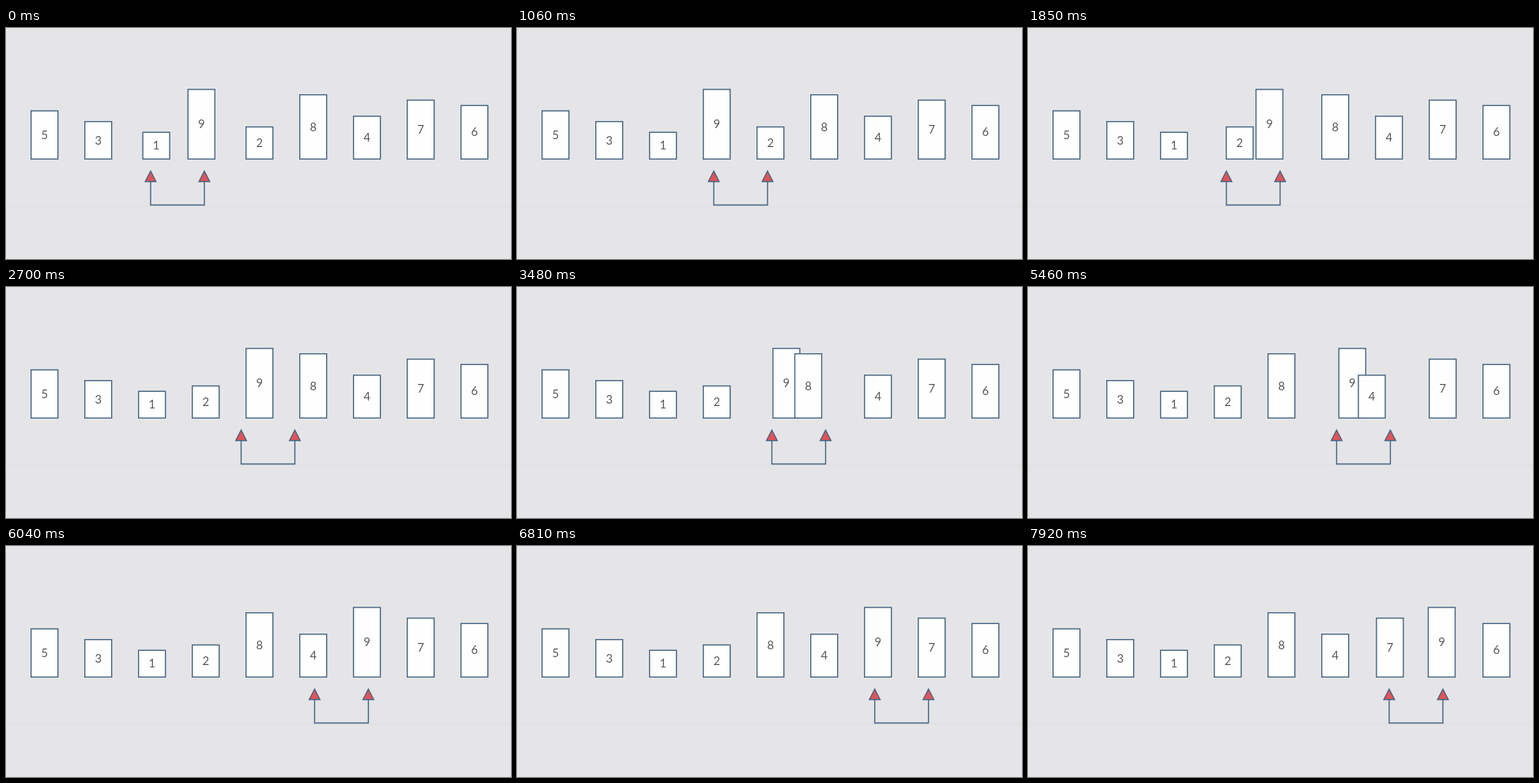
An HTML page for the animation above (8 s loop, 639 by 293 pixels).

```html
<!DOCTYPE html>
<html lang="en">
<head>
<meta charset="utf-8">
<title>Bubble sort</title>
<style>
  html, body { margin: 0; width: 100%; height: 100%; overflow: hidden; background: #e5e5e7; }
  svg { display: block; width: 639px; height: 293px; }
  rect, path { stroke: #456382; stroke-width: 1.4; }
  rect { fill: #fefefe; }
  text { font: 14.8px Lato, "Open Sans", sans-serif; fill: #595959; text-anchor: middle; }
  .guide { stroke: #dededf; stroke-width: 1; }
  .link { fill: none; }
  .tip { fill: #e05458; }
</style>
</head>
<body>
<svg viewBox="0 0 639 293">
  <path class="guide" d="M0 226H639"/>
  <g id="bars"></g>
  <g id="pointer">
    <path class="link" d="M0 195V224.5H68V195"/>
    <path class="tip" d="M0 181.5L6.8 194.7H-6.8ZM68 181.5L74.8 194.7H61.2Z"/>
  </g>
</svg>
<script>
const LOOP = 8000, STEP = 98.25;
const FIRST_END = 200, PERIOD = 1951, SWAP = 1000, MOVE = 945;
const start = [5, 3, 9, 1, 2, 8, 4, 7, 6];
const pointerStops = [183, 251, 322.5, 390.5, 457];
const barsGroup = document.getElementById('bars');
const pointer = document.getElementById('pointer');

const clamp = v => Math.max(0, Math.min(1, v));
const ease = v => v < 0.5 ? 2 * v * v : 1 - 2 * (1 - v) ** 2;
const progress = (t, from, length) => ease(clamp((t - from) / length));
const slotX = slot => 48.7 + 68 * slot;
const place = (node, x) => node.setAttribute('transform', `translate(${x.toFixed(2)} 0)`);

function makeBar(value) {
  const height = 27.1 + 6.8 * value;
  const bar = document.createElementNS('http://www.w3.org/2000/svg', 'g');
  bar.innerHTML = `<rect x="-17" y="${166.2 - height}" width="34" height="${height}"/>
    <text y="${171.4 - height / 2}">${value}</text>`;
  barsGroup.append(bar);
  return bar;
}
const bars = start.map(makeBar);

function draw(now) {
  // The picture advances in steps of about a tenth of a second.
  const tick = Math.floor((now % LOOP + 70) / STEP);
  const t = Math.max(0, tick * STEP - 50);

  // The 9 trades places with each right-hand neighbour in turn.
  let travelled = 0;
  let pointerX = pointerStops[0];
  pointerStops.forEach((stop, i) => {
    const end = FIRST_END + i * PERIOD;
    const swapped = progress(t, end - SWAP, SWAP);
    travelled += swapped;
    place(bars[3 + i], slotX(3 + i - swapped));
    if (i < 4) pointerX += (pointerStops[i + 1] - stop) * progress(t, end, MOVE);
  });
  place(bars[2], slotX(2 + travelled));
  place(pointer, pointerX);
  requestAnimationFrame(draw);
}

[0, 1, 8].forEach(i => place(bars[i], slotX(i)));
draw(performance.now());
</script>
</body>
</html>
```
